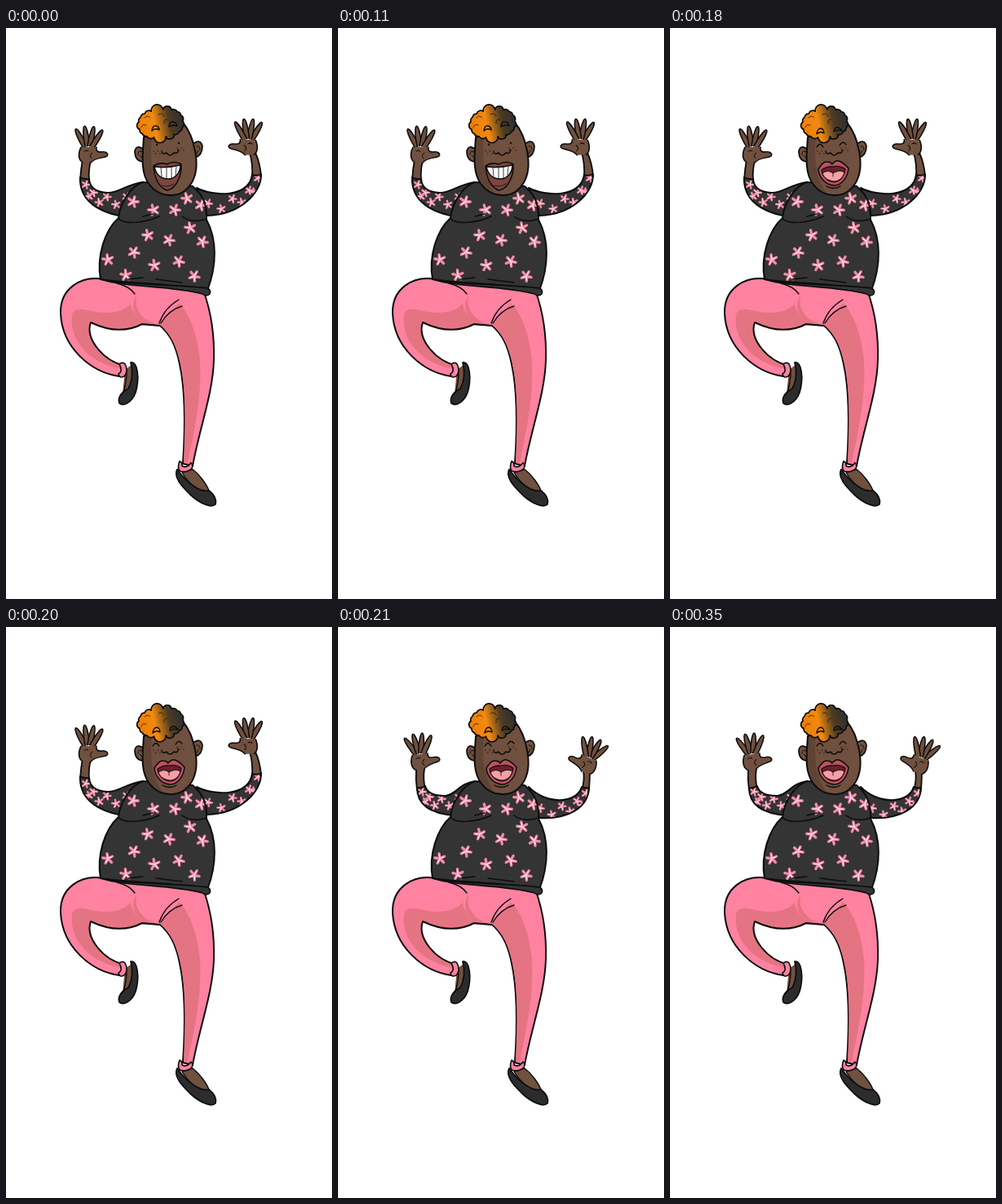
An HTML page that plays this animation: 400x700 px, repeating every 450 ms.

```html
<!DOCTYPE html>
<html lang="en">
<head>
<meta charset="utf-8">
<title>Dancer</title>
<style>
html, body { margin: 0; width: 100%; height: 100%; overflow: hidden; background: #fff; }
svg { display: block; width: 400px; height: 700px; }
</style>
</head>
<body>
<svg id="stage" viewBox="0 0 400 700" stroke-linecap="round" stroke-linejoin="round"></svg>
<script>
const INK = '#0b0c0e', SKIN = '#70503e', SHADE = '#5f4435', CLOTH = '#343435',
  PINK = '#ff82a0', ROSE = '#e57482', SHOE = '#2c2c2d';
const LOOP = 450;

const shape = (d, fill = 'none', stroke = INK, w = 2) =>
  `<path d="${d}" fill="${fill}" stroke="${stroke}" stroke-width="${w}"/>`;
const line = (d, w = 1.5) => shape(d, 'none', INK, w);
const flat = (d, fill) => shape(d, fill, 'none', 0);
const group = (body, attrs = '') => `<g ${attrs}>${body}</g>`;
const range = n => [...Array(n).keys()];

function flower(x, y, turn, size = 1) {
  const petals = (len, step) => range(5).filter(k => k % step == 0).map(k => {
    const a = (k * 72 + turn) * Math.PI / 180;
    return `M0,0L${(len * Math.cos(a)).toFixed(1)},${(len * Math.sin(a)).toFixed(1)}`;
  }).join('');
  return group(shape(petals(6.3, 1), 'none', '#f78ba6', 3.3) + shape(petals(5, 2), 'none', '#ffe9ee', 1.2),
    `transform="translate(${x} ${y}) scale(${size})"`);
}

// Cloth with flowers cut off at its edge.
const fabric = (id, d, print) =>
  `<clipPath id="${id}"><path d="${d}"/></clipPath>` + flat(d, CLOTH) +
  group(print, `clip-path="url(#${id})"`) + line(d, 2);

// Hand around the middle of its palm, fingers in an even fan.
const thumb = 'M10,-7C9,-1 13,-1 16,-1C24,-2 26,4 21,5C13,7 7,7 3,12';
const heel = 'C-12,8 -13,1 -9,-7';
const finger = shape('M-2.8,-8Q-3.7,-24 -1.6,-31Q0,-35 1.6,-31Q3.7,-24 2.8,-8', SKIN, INK, 1.5);
const hand = (x, y, turn, flip = 1) => group(
  range(4).map(k => group(finger, `transform="rotate(${k * 20 - 28})"`)).join('') +
  flat(`${thumb}L-8,11${heel}Z`, SKIN) + line(thumb) + line('M-8,11' + heel) +
  line('M5,0Q0,3 4,7M-5,-2Q-2,-4 0,-2', 1),
  `transform="translate(${x} ${y}) rotate(${turn}) scale(${flip} 1)"`);

// Sleeve flowers zigzag along a curve from the wrist to the shoulder.
function sleevePrint([x0, y0, x1, y1, x2, y2]) {
  return range(7).map(i => {
    const t = i / 6, bend = (a, b, c) => (1 - t) ** 2 * a + 2 * t * (1 - t) * b + t * t * c;
    return flower(bend(x0, x1, x2), bend(y0, y1, y2) + (i % 2 ? 5 : -4), i * 37, .75);
  }).join('');
}
const arm = (id, sleeve, fore, curve, palm) =>
  shape(fore, SKIN, INK, 1.8) + hand(...palm) + fabric(id, sleeve, sleevePrint(curve));

const armsHigh =
  arm('lh', 'M91,183C90,206 105,224 143,231L168,189C147,192 139,202 125,202C110,201 103,196 102,185Q96,186 91,183Z',
    'M94,161Q92,172 91,186L102,186Q101,174 104,163', [98, 196, 106, 214, 148, 211], [101, 153, 0]) +
  arm('rh', 'M313,179C314,202 287,229 247,230L234,196C255,207 298,208 302,180Q308,182 313,179Z',
    'M299,153Q303,166 302,183L313,182Q312,166 306,153', [309, 188, 300, 214, 248, 219], [297, 144, 3, -1]);

const armsLow =
  arm('ll', 'M97,197C97,220 116,229 143,231L168,189C148,192 146,205 132,207C118,207 109,203 107,195Q102,198 97,197Z',
    'M96,173Q95,187 97,200L107,199Q104,185 106,174', [103, 206, 112, 218, 148, 213], [101, 163, -8]) +
  arm('rl', 'M308,197C307,222 282,236 247,234L234,196C255,218 293,217 299,196Q304,198 308,197Z',
    'M301,176Q303,188 299,200L308,200Q309,187 309,176', [304, 208, 294, 225, 248, 226], [306, 167, 22, -1]);

const legBack = 'M165,312L243,324C251,347 256,374 255,407C254,448 237,492 229,537L217,534C220,490 220,444 213,412C208,387 200,374 188,364L165,363Z';
const legFront = 'M120,308C91,303 66,320 67,350C69,392 104,422 139,427L146,414C119,408 97,381 104,361C123,370 146,374 167,363L193,345L205,318Z';

const trousers =
  shape(legBack, PINK) +
  flat('M189,364C203,376 209,390 214,412C221,444 220,490 218,532L223,533C233,485 240,452 238,408C236,382 227,352 213,338Z', ROSE) +
  flat(legFront, PINK) +
  flat('M167,363C146,373 123,370 104,361C97,381 119,408 144,414L142,418C105,412 77,385 81,352Q83,342 100,346C124,352 146,349 154,336Q158,352 167,363Z', ROSE) +
  flat('M157,320Q145,338 166,362L188,364Q207,344 214,322Z', PINK) +
  flat('M166,362L188,364Q203,345 214,336L207,347Q195,352 189,364Q172,360 166,352Q157,342 160,327Q150,345 166,362Z', ROSE) +
  line('M120,308C91,303 66,320 67,350C69,392 104,422 139,427M146,414C119,408 97,381 104,361C123,370 146,374 167,363L188,365', 2) +
  line('M136,313Q152,317 158,326M212,333C200,340 192,350 188,362M216,341C205,344 196,352 190,362', 1.4);

const feet =
  flat('M146,419L154,413L157,440L143,449Z', SKIN) +
  shape('M153,410C162,409 164,430 159,447C154,460 144,464 139,460C136,452 144,445 150,442C155,433 156,420 153,410Z', SHOE, INK, 1.7) +
  line('M148,421Q148,434 144,447', 1.4) +
  shape('M139,412Q145,408 147,414Q150,421 145,427Q139,430 138,424Q144,421 139,412Z', PINK, INK, 1.6) +
  shape('M210,541C205,551 216,562 226,572C238,583 252,589 257,584C259,577 254,571 249,567C240,569 224,561 210,541Z', SHOE, INK, 1.7) +
  shape('M216,545L229,541C237,547 246,559 249,567C238,569 225,560 216,545Z', SKIN, INK, 1.4) +
  shape('M213,531Q210,538 213,543Q221,546 228,540Q230,536 227,533Q222,540 216,537Q217,533 213,531Z', PINK, INK, 1.6);

const shirt = 'M168,189C153,194 140,214 138,233C121,248 111,280 116,308C150,314 200,312 247,322C259,291 259,259 246,235C247,216 241,204 229,194Z';
const blooms = '156,213 181,223 207,223 222,209 239,217 174,254 200,260 226,245 241,262 125,284 157,275 182,291 212,286 147,303 231,304';
const torso =
  fabric('body', shirt, blooms.split(' ').map((p, i) => flower(...p.split(','), i * 37)).join('')) +
  line('M138,233C143,241 168,240 188,231M216,231C224,237 236,238 246,234M168,231L180,228M150,308L168,306M184,308L216,312') +
  shape('M116,308C150,316 200,313 247,319Q252,321 250,326Q246,330 241,326C200,315 150,319 116,308Z', CLOTH, INK, 1.6);

const face = 'M169,134C168,153 164,177 176,192C188,208 214,211 227,191C241,170 230,131 217,116Z';

// Even curls around a rounded box.
function curls(cx, cy, rx, ry, n) {
  const round = v => Math.sign(v) * Math.abs(v) ** .75;
  const points = range(n + 1).map(k => {
    const a = k / n * 2 * Math.PI;
    return `${(cx + rx * round(Math.cos(a))).toFixed(1)},${(cy + ry * round(Math.sin(a))).toFixed(1)}`;
  });
  return 'M' + points.join('A5.2 5.2 0 0 1 ') + 'Z';
}

const freckles = range(8).map(k => {
  const right = k > 3, j = k % 4;
  return `<circle cx="${(right ? 210 : 181) + j * 2.7}" cy="${(right ? 147 : 151) + (j % 2) * 3}" r=".8" fill="#2a1a14"/>`;
}).join('');

const head =
  shape('M169,149Q160,142 158,151Q158,164 170,164', SKIN, INK, 1.7) +
  shape('M231,141Q239,136 241,145Q241,156 232,159', SKIN, INK, 1.7) +
  line('M167,152Q162,149 162,155M164,156L167,159M234,145Q238,144 238,149M236,150L234,154', 1) +
  flat(face, SKIN) +
  flat('M169,134C168,153 164,177 176,192C181,199 188,203 194,205Q174,180 179,135Z', SHADE) +
  line(face, 2) + freckles +
  line('M191,151Q191,156 197,153Q201,159 206,153Q212,155 211,149', 1.5) +
  `<linearGradient id="dye" gradientUnits="userSpaceOnUse" x1="162" y1="120" x2="216" y2="114">
    <stop offset="0" stop-color="#ee7d06"/><stop offset=".38" stop-color="#f28a10"/>
    <stop offset=".72" stop-color="#4d3b22"/><stop offset="1" stop-color="#30302f"/></linearGradient>` +
  group(shape(curls(190, 117, 27, 16.5, 17), 'url(#dye)', INK, 1.7), 'transform="rotate(-6 190 117)"') +
  line('M170,110Q174,106 177,110M166,122Q167,117 172,119M187,106Q192,103 194,108M194,117Q193,112 198,112', .7);

const grin =
  line('M179,126Q180,119 184,120Q188,121 188,125Q183,122 179,126M200,121Q201,114 205,115Q209,116 210,120Q205,118 200,121', 1.4) +
  `<g fill="${INK}"><circle cx="185" cy="143" r="1.2"/><circle cx="212" cy="141" r="1.2"/></g>` +
  shape('M181,169Q189,164 197,167Q207,162 215,167C216,180 209,197 198,199C188,197 182,184 181,169Z', '#7c4540', INK, 1.5) +
  shape('M182,170Q198,172 214,168C214,178 207,185 199,185C190,185 184,179 182,170Z', '#fff', INK, 1.5) +
  line('M190,171L191,182M197,171V185M203,170V185M209,170L208,180', .8) +
  line('M191,193Q199,196 206,191', .8);

const laugh =
  line('M180,130Q181,123 185,123Q189,124 189,129Q184,126 180,130M201,127Q202,121 206,122Q210,123 211,126Q206,124 201,127', 1.3) +
  line('M180,146Q184,139 188,146M208,144Q212,137 216,143', 1.4) +
  shape('M182,173Q188,163 193,164Q197,164 199,167Q203,162 207,163Q213,165 219,172C218,183 211,193 201,193C191,192 183,184 182,173Z', '#bf4f60', INK, 1.5) +
  shape('M186,174Q193,169 200,170Q208,168 215,173C214,182 208,189 201,189C193,188 187,182 186,174Z', '#6b202a', INK, 1.2) +
  shape('M187,178Q194,173 200,178Q208,173 214,177C212,184 207,188 201,188C194,187 189,184 187,178Z', '#f5a0a5', INK, .9) +
  line('M200,178V182', .8) + line('M192,194Q201,199 209,194', 1.3);

document.getElementById('stage').innerHTML =
  group(armsHigh, 'id="high"') + group(armsLow, 'id="low"') +
  trousers + feet + torso + head +
  group(grin, 'id="grin"') + group(laugh, 'id="laugh"');

// Hard swap from one pose to the next, once per loop.
function swap(before, after, ms) {
  const play = (id, first) => document.getElementById(id).animate(
    [[0, first], [ms / LOOP, 1 - first], [1, 1 - first]]
      .map(([offset, opacity]) => ({ offset, opacity, easing: 'steps(1, end)' })),
    { duration: LOOP, iterations: Infinity });
  play(before, 1);
  play(after, 0);
}
swap('grin', 'laugh', 180);
swap('high', 'low', 210);
</script>
</body>
</html>
```
